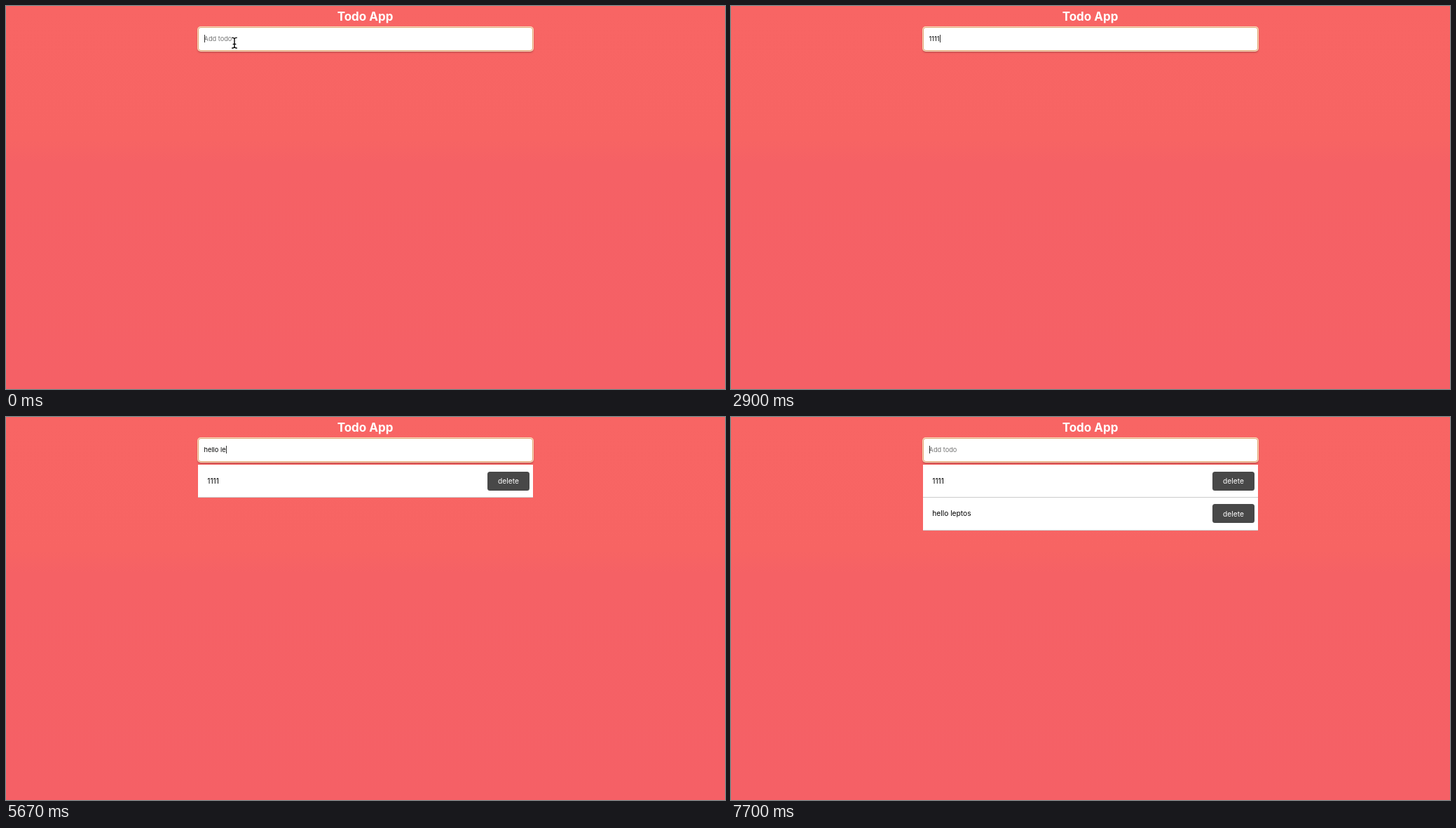
These frames come from a looping animation (1026x546 px, 8 s). An HTML page:

```html
<!DOCTYPE html>
<html lang="en">
<head>
<meta charset="utf-8">
<title>Todo App</title>
<style>
  html, body { margin: 0; width: 100%; height: 100%; overflow: hidden; }
  body {
    position: relative;
    background: linear-gradient(#f86564 0, #f76463 190px, #f56165 222px, #f56066 100%);
    font: 10.2px/20px Inter, "Open Sans", sans-serif;
    color: #000;
  }
  h1, .field, .entry, .row, .row span, .row button, #caret, #pointer { position: absolute; }
  h1 {
    left: 0; top: 4.6px; width: 1025px; margin: 0;
    text-align: center; font-size: 17px; font-weight: 700; color: #fff;
  }
  .field {
    left: 274px; top: 30px; width: 476px; height: 32px;
    border: 1px solid #e0a474; border-radius: 4px; background: #fff;
    box-shadow: 0 0 0 1px #fbdcc0, 0 2px 3px rgba(0, 0, 0, .3);
  }
  .entry { left: 282.6px; top: 36.8px; height: 20px; font-size: 9.2px; white-space: pre; }
  .entry.empty { color: #757575; }
  #caret { left: 100%; top: 4.2px; width: 1px; height: 11px; background: #333; }
  .empty #caret { left: .4px; }
  .row {
    left: 273.6px; width: 478.4px; height: 46px;
    background: #fff; border-bottom: .7px solid #ccc;
  }
  .row span { left: 13.7px; top: 12.7px; white-space: pre; }
  .row button {
    left: 413.4px; top: 9.8px; width: 60px; height: 27px; padding: 0;
    border: 0; border-radius: 3.5px; background: #484848; color: #fff; font: inherit;
  }
  #pointer { left: 0; top: 0; width: 12px; height: 20px; }
</style>
</head>
<body>
<h1>Todo App</h1>
<div class="field"></div>
<div class="entry" id="entry"><span id="text"></span><i id="caret"></i></div>
<div class="row" style="top:68px"><span>1111</span><button>delete</button></div>
<div class="row" style="top:114.7px"><span>hello leptos</span><button>delete</button></div>
<svg id="pointer" viewBox="-6 -10 12 20" fill="none" stroke-linecap="round">
  <g id="beam">
    <path id="ibeam" stroke="#fff" stroke-width="2.6"
      d="M-3.3-7.3Q-.3-7.3 0-5.3Q.3-7.3 3.3-7.3M0-5.3V5.6M-3.3 7.6Q-.3 7.6 0 5.6Q.3 7.6 3.3 7.6M-1.8 2H1.8"/>
    <path stroke="#000" stroke-width="1.4"
      d="M-3.3-7.3Q-.3-7.3 0-5.3Q.3-7.3 3.3-7.3M0-5.3V5.6M-3.3 7.6Q-.3 7.6 0 5.6Q.3 7.6 3.3 7.6M-1.8 2H1.8"/>
  </g>
</svg>
<script>
  const LOOP = 8000;
  const $ = id => document.getElementById(id);
  const entry = $('entry'), text = $('text'), caret = $('caret'), pointer = $('pointer');
  const rows = [...document.querySelectorAll('.row')];
  const added = [3200, 7000];

  // time, field value, caret visible
  const steps = [
    [0, '', 1], [100, '1', 1], [630, '1', 0], [1130, '1', 1],
    [1400, '11', 1], [1630, '111', 1], [1870, '1111', 1],
    [2400, '1111', 0], [2900, '1111', 1],
    [3200, '', 1], [3400, '', 0], [3900, '', 1],
    [4000, 'h', 1], [4100, 'he', 1], [4530, 'hel', 1], [4700, 'hell', 1],
    [5130, 'hello', 1], [5300, 'hello ', 1], [5500, 'hello l', 1],
    [5670, 'hello le', 1], [5930, 'hello lep', 1], [6230, 'hello lept', 1],
    [6430, 'hello lepto', 1], [6700, 'hello leptos', 1],
    [7000, '', 1], [7200, '', 0], [7700, '', 1]
  ];

  const show = (el, on) => { el.style.visibility = on ? 'visible' : 'hidden'; };

  function pointerX(t) {
    const tick = Math.floor((t + 4) / 33.333) * 33.333;
    const p = Math.min(1, Math.max(0, (tick - 890) / 380));
    return 326 + 18 * p * p * (3 - 2 * p);
  }

  function draw(t) {
    const [, value, lit] = steps.findLast(s => s[0] <= t);
    const shown = value || 'Add todo';
    if (text.textContent !== shown) text.textContent = shown;
    entry.classList.toggle('empty', !value);
    show(caret, lit);
    rows.forEach((row, i) => show(row, t >= added[i]));
    show(pointer, t < 130 || (t >= 900 && t < 1430));
    pointer.style.transform = `translate(${pointerX(t) - 6}px, 42.4px)`;
  }

  const start = performance.now();
  function frame() {
    draw((performance.now() - start) % LOOP);
    requestAnimationFrame(frame);
  }
  frame();
</script>
</body>
</html>
```
